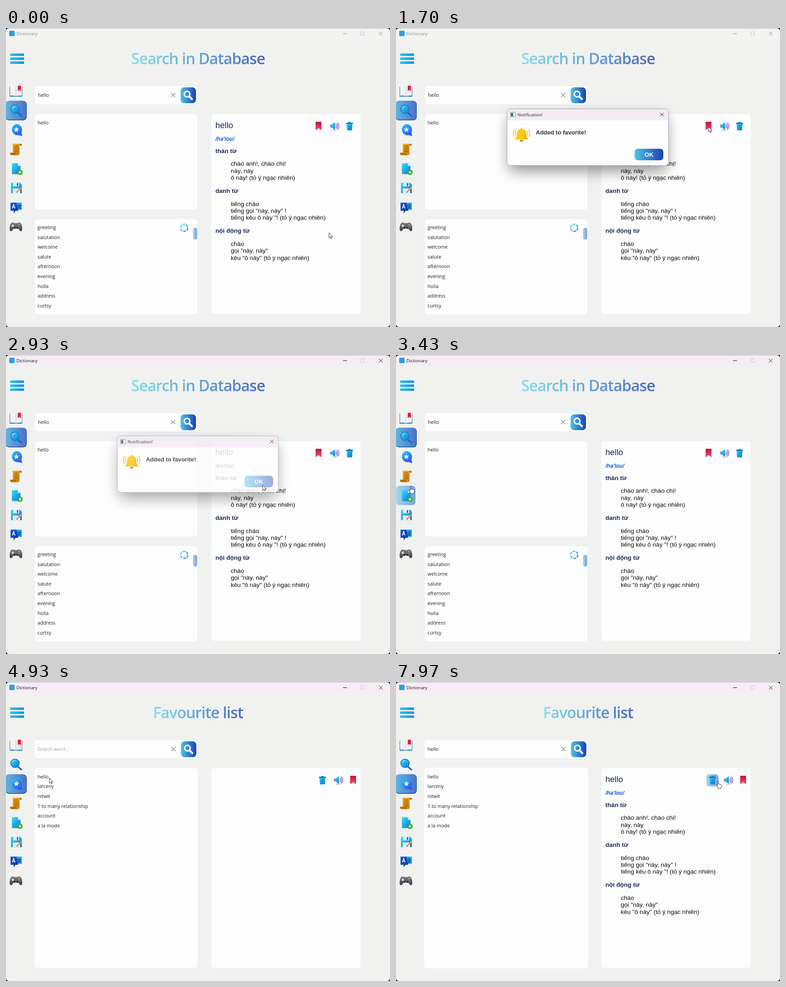
Animation of 849 by 660 pixels, one loop 8000 ms. Source, as an HTML page:

```html
<!DOCTYPE html>
<html lang="en">
<head>
<meta charset="utf-8">
<title>Dictionary</title>
<style>
html, body { margin: 0; width: 100%; height: 100%; overflow: hidden; background: #1c3350; }
svg { display: block; width: 100vw; height: 100vh; }
text { white-space: pre; }
.ui { font-family: "Open Sans", "Noto Sans", sans-serif; font-size: 10.7px; font-weight: 500; fill: #222; }
.bar { font-size: 9.8px; font-weight: 400; }
.head { font-size: 34px; font-weight: 600; letter-spacing: -1px; fill: url(#headFill); text-anchor: middle; }
.def { font-family: "Liberation Sans", Arial, sans-serif; font-size: 13.6px; fill: #0c0c10; }
.kind { font-weight: bold; fill: #1c2852; }
.panel { fill: #fcfdfc; stroke: #e0eef5; stroke-width: 1; }
</style>
</head>
<body>
<svg viewBox="0 0 849 660" preserveAspectRatio="none">
<defs>
  <linearGradient id="headFill"><stop stop-color="#82e0ee"/><stop offset="1" stop-color="#4a69c0"/></linearGradient>
  <linearGradient id="button"><stop stop-color="#4cc6e6"/><stop offset="1" stop-color="#1b3fb4"/></linearGradient>
  <linearGradient id="tile"><stop stop-color="#62b4e2"/><stop offset="1" stop-color="#4c70c6"/></linearGradient>
  <linearGradient id="soft"><stop stop-color="#a5d6ee"/><stop offset="1" stop-color="#7d9fdb"/></linearGradient>
  <linearGradient id="cyan" x2="1" y2="1"><stop stop-color="#2fe0f8"/><stop offset="1" stop-color="#1470d8"/></linearGradient>
  <linearGradient id="bubble" x2=".6" y2="1"><stop stop-color="#1cd0f4"/><stop offset="1" stop-color="#3a52f0"/></linearGradient>
  <linearGradient id="red" x2="0" y2="1"><stop stop-color="#c8103c"/><stop offset="1" stop-color="#f0506c"/></linearGradient>
  <linearGradient id="gold" x2="1" y2="1"><stop stop-color="#f4b428"/><stop offset="1" stop-color="#c87808"/></linearGradient>
  <linearGradient id="navy" x2="1" y2="1"><stop stop-color="#1460d8"/><stop offset="1" stop-color="#0a2c90"/></linearGradient>
  <linearGradient id="pad" x2="0" y2="1"><stop stop-color="#7c7f86"/><stop offset="1" stop-color="#3c3e46"/></linearGradient>
  <filter id="blur" x="-30%" y="-60%" width="160%" height="220%"><feGaussianBlur stdDeviation="16"/></filter>

  <g id="bookmark"><path d="M-6.5-9.5h13v19L0 4.5l-6.500 5z" fill="url(#red)"/></g>
  <g id="speaker">
    <ellipse cx="0" cy="9" rx="6" ry="1" fill="#b8c4cc"/>
    <path d="M-9-3.500h5v7h-5z" fill="#8b9bb0"/>
    <path d="M-5-3.500L2-8.500V8.500L-5 3.500z" fill="url(#cyan)"/>
    <g fill="none" stroke="#6a58c8" stroke-width="1.500" stroke-linecap="round">
      <path d="M4-2.500a3.500 3.500 0 0 1 0 5M5.500-5a6.500 6.500 0 0 1 0 10" /><path d="M7-7.300a9 9 0 0 1 0 14.600" stroke="#a04cc0"/>
    </g>
  </g>
  <g id="trash">
    <path d="M-6.500-5h13L5.500 8.500q-.2 1-1.200 1h-8.600q-1 0-1.200-1z" fill="url(#cyan)"/>
    <path d="M-7.500-7.500h15v2.800h-15zM-2.500-9h5v2h-5z" fill="#0e74c0"/>
    <path d="M-3-3l.5 10M0-3v10M3-3l-.5 10" stroke="#1280cc" stroke-width="1"/>
  </g>
  <g id="lens" fill="none" stroke="#fff" stroke-width="3">
    <circle cx="-2.200" cy="-2.500" r="6.200"/><path d="M2.800 2.800L8.500 8.500" stroke-width="4.500" stroke-linecap="round"/>
  </g>
  <g id="i0">
    <path d="M-14-9v22h28V-9z" fill="#1c78b4"/>
    <path d="M-13-10q7-2 13 1q6-3 13-1v21q-7-1-13 1q-6-2-13-1z" fill="#f3f3f5"/>
    <path d="M0-9V12" stroke="#c4c8d0" stroke-width="1.300"/>
    <path d="M4-11h7v12l-3.500-3L4 1z" fill="#e01c3c"/>
  </g>
  <g id="i1">
    <path d="M5 6L12 12" stroke="#1668b8" stroke-width="3.500" stroke-linecap="round"/>
    <circle cx="-2" cy="-2" r="9.500" fill="url(#cyan)" stroke="#1678bc" stroke-width="1.500"/>
    <path d="M-8-3a6.500 6.500 0 0 1 6-5.500" fill="none" stroke="#8ceefc" stroke-width="1.300"/>
  </g>
  <g id="i2">
    <path d="M1-12.500a12.500 12.500 0 0 1 11 18.500l2 8-8-2a12.500 12.500 0 1 1-5-24.500z" fill="url(#bubble)"/>
    <path id="star" fill="#fff"/>
  </g>
  <g id="i3">
    <path d="M-8-12H10q3 0 3 4H8V9q0 4-4 4h-14q-3 0-3-5h6V-8z" fill="url(#gold)"/>
    <path d="M-13 8h14q0 5 3 5h-14q-3 0-3-5zM8-8q0-4 2.500-4t2.500 4z" fill="#b86c08"/>
    <path d="M-4-7h9M-4-3h9M-4 1h9M-4 5h9" stroke="#9a5808" stroke-width="1.300"/>
  </g>
  <g id="i4">
    <path d="M-9-12H4l6 6V12H-9z" fill="url(#cyan)"/><path d="M4-12v6h6z" fill="#a4f2fc"/>
    <circle cx="9" cy="8" r="6" fill="#38b438"/><path d="M6 8h6M9 5v6" stroke="#fff" stroke-width="1.500"/>
  </g>
  <g id="i5">
    <path d="M-11-12H9l4 4V11H-11z" fill="url(#cyan)"/>
    <path d="M-6-12H7v8H-6z" fill="#e8f0f6"/><path d="M2-11h3v6H2z" fill="#1464a8"/>
    <path d="M-7 1H9v10H-7z" fill="#fafafa"/><path d="M-5 4H3M-5 7H1" stroke="#b0bcc8"/>
    <path d="M3 8L12-1" stroke="#f09820" stroke-width="3.200"/><path d="M1 10l1-3 2 2z" fill="#503820"/>
  </g>
  <g id="i6">
    <path d="M0-11H13V5H0z" fill="#20a4ec"/>
    <path d="M-12-11H1L5 7H-1L-5 13V7h-7z" fill="url(#navy)"/>
    <path d="M-8 2l3-9 3 9M-7-1h4" fill="none" stroke="#fff" stroke-width="1.500"/>
    <path d="M3-5h8M7-7v2M4 2q5-2 6-7M4.500-4q1 4 6 6" fill="none" stroke="#123c90" stroke-width="1.300"/>
  </g>
  <g id="i7">
    <path d="M-8-10q3-1 4 1h8q1-2 4-1c4 0 6 8 6 14s-4 6-6 3l-3-4h-10l-3 4c-2 3-6 3-6-3s2-14 6-14z" fill="url(#pad)"/>
    <path d="M-10-3h6M-7-6v6" stroke="#e4e4e8" stroke-width="2"/>
    <circle cx="7" cy="-5.500" r="1.300" fill="#f0c030"/><circle cx="7" cy="-.5" r="1.300" fill="#48b848"/>
    <circle cx="4.500" cy="-3" r="1.300" fill="#3c90e8"/><circle cx="9.500" cy="-3" r="1.300" fill="#e84040"/>
    <circle cx="-3" cy="2" r="2" fill="#292b32"/><circle cx="3" cy="2" r="2" fill="#292b32"/>
  </g>
</defs>

<rect width="849" height="660" fill="#1c3350"/>
<rect y=".5" width="849" height="659.500" rx="7" fill="#f1f2ef"/>
<path id="titleBar" d="M0 25V7.500a7 7 0 0 1 7-7h835a7 7 0 0 1 7 7V25z"/>
<rect x="7" y="6" width="12" height="12" rx="2" fill="#2f9fe0"/>
<text id="appName" class="ui bar" x="23" y="16.300">Dictionary</text>
<g id="controls" fill="none" stroke-width="1"><path d="M745 12.500h9M824.500 8.500l8 8M832.500 8.500l-8 8"/></g>
<rect x="784.500" y="8.500" width="7.500" height="7.500" rx="1" fill="none" stroke="#c4c0c6"/>

<g fill="url(#cyan)">
  <rect x="9" y="56" width="31" height="5.500" rx="1.500"/><rect x="9" y="64.800" width="31" height="5.500" rx="1.500"/><rect x="9" y="73.500" width="31" height="5.500" rx="1.500"/>
</g>
<rect id="hoverTile" width="43" height="43" rx="8" fill="url(#soft)"/>
<g id="activeTile"><rect x="-1" y="-21" width="47" height="43" rx="8" fill="#244a80"/><rect x="-1" y="-21" width="46.500" height="41.500" rx="8" fill="url(#tile)"/></g>
<g id="side"></g>

<g id="searchPage">
  <text class="ui head" x="424.500" y="80">Search in Database</text>
  <rect class="panel" x="63" y="127" width="361" height="42.500" rx="8"/>
  <rect class="panel" x="63" y="189" width="361" height="212.500" rx="8"/>
  <rect class="panel" x="63" y="421" width="361" height="212" rx="8"/>
  <text class="ui" x="70.500" y="152">hello</text>
  <g id="related"></g>
  <circle cx="394" cy="441" r="8" fill="none" stroke="url(#cyan)" stroke-width="2.200" stroke-dasharray="6.380 2"/>
  <rect x="413.500" y="441" width="9" height="26" rx="4" fill="url(#soft)"/>
</g>
<g id="favPage">
  <text class="ui head" x="424.500" y="80">Favourite list</text>
  <rect class="panel" x="62" y="127" width="362" height="42.500" rx="8"/>
  <rect id="favList" class="panel" rx="8"/>
  <text id="query" class="ui" x="69.500" y="152"></text>
  <g id="favs"></g>
</g>
<g id="searchTools">
  <path d="M365 143.500l9 9M374 143.500l-9 9" stroke="#b0b0ae" stroke-width="2.200"/>
  <rect x="386" y="131" width="34" height="35" rx="8" fill="url(#button)"/><use href="#lens" x="402.500" y="148.500"/>
</g>
<rect class="panel" x="453" y="189" width="332" height="443" rx="8"/>
<g id="entry"></g>
<rect id="hoverTool" y="203.500" width="27" height="27" rx="7" fill="url(#soft)"/>
<use id="trashTool" href="#trash" y="216.500"/><use id="soundTool" href="#speaker" y="216.500"/><use id="markTool" href="#bookmark" y="216.500"/>

<g id="dialog">
  <rect x="250" y="196" width="348" height="120" rx="10" fill="#000" opacity=".42" filter="url(#blur)"/>
  <rect x="245.500" y="178.500" width="357" height="125" rx="8" fill="#fdfdfd" stroke="#a5a3a8"/>
  <path d="M246 204v-17a8 8 0 0 1 8-8h340a8 8 0 0 1 8 8v17z" fill="#f4ecf3"/>
  <rect x="253" y="186" width="11" height="10" fill="#eef2f4" stroke="#8c9298"/><rect x="254" y="187.500" width="5" height="7.500" fill="#258078"/>
  <text class="ui bar" x="268.500" y="195">Notification!</text>
  <path d="M584 187l8 8M592 187l-8 8" stroke="#222"/>
  <g transform="translate(277.500 235)">
    <path d="M0-15q2 0 2 3c6 1 8 6 8 12 0 5 2 8 5 11h-30c3-3 5-6 5-11 0-6 2-11 8-12q0-3 2-3z" fill="#fac814"/>
    <path d="M4-11c5 2 6 6 6 11 0 5 2 8 5 11H5c2-7 2-15-1-22z" fill="#f0b010"/>
    <path d="M-4 12h8q-1 4-4 4t-4-4z" fill="#c88008"/>
    <path d="M-12-9q-3 6 0 12M-16-11q-4 8 0 16M12-9q3 6 0 12M16-11q4 8 0 16" fill="none" stroke="#ecc040" stroke-width="1.800" stroke-linecap="round"/>
  </g>
  <text class="def" x="309" y="235" style="font-size:13px;font-weight:bold;fill:#333">Added to favorite!</text>
  <g id="ok"><rect x="527.500" y="266.500" width="63.500" height="25.500" rx="7" fill="url(#button)"/></g>
  <text class="def" x="559.300" y="284" text-anchor="middle" style="font-size:13px;font-weight:bold;fill:#fff">OK</text>
</g>

<path id="arrow" d="M0 0V11.500L2.700 9 4.500 13l1.800-.8L4.600 8.300H8z" fill="#fff" stroke="#222" stroke-width=".9"/>
<path id="hand" d="M-1 .5q1-1.500 2 0V6l5.500 1.500q1.500.5 1.300 2.500L7 13.500 6 16H0l-1.500-3L-4 9.500q0-2 2-1l1 1z" fill="#fff" stroke="#222" stroke-width=".9"/>
</svg>

<script>
const LOOP = 8000;
const PRESS = 1000, OPEN = 1180, CLOSE = 2900, FADE = 200, SWITCH = 4000, PICK = 5100;
const $ = id => document.getElementById(id);
const set = (el, attrs) => { for (const k in attrs) el.setAttribute(k, attrs[k]); };
const show = (id, on) => { $(id).style.display = on ? "" : "none"; };
const add = (parent, tag, attrs, text = "") => {
  const el = document.createElementNS("http://www.w3.org/2000/svg", tag);
  set(el, attrs);
  el.textContent = text;
  parent.append(el);
  return el;
};

const sideY = i => 138.5 + 43 * i;
for (let i = 0; i < 8; i++) add($("side"), "use", { href: "#i" + i, x: 22, y: sideY(i) });

set($("star"), { d: "M" + Array.from({ length: 10 }, (_, i) => {
  const r = i % 2 ? 2.7 : 6.3, a = i * Math.PI / 5;
  return [1 + r * Math.sin(a), -r * Math.cos(a)].map(v => v.toFixed(2));
}).join("L") + "z" });

const list = (id, y, words) => words.forEach((word, i) =>
  add($(id), "text", { class: "ui", x: 69.8, y: y + 21.6 * i }, word));
list("related", 212.7, ["hello"]);
list("related", 444, ["greeting", "salutation", "welcome", "salute", "afternoon", "evening", "holla", "address", "curtsy"]);
list("favs", 212.7, ["hello", "larceny", "nitwit", "1 to many relationship", "account", "a la mode"]);

const line = (x, y, text, cls = "def", style = "") => add($("entry"), "text", { x, y, class: cls, style }, text);
line(463, 221.3, "hello", "def", "font-size:18.5px;fill:#1a2550");
line(463, 249, "/hə'lou/", "def", "font-size:12px;font-weight:bold;font-style:italic;fill:#0c5ce0");
[
  ["thán từ", "chào anh!, chào chị!", "này, này", "ô này! (tỏ ý ngạc nhiên)"],
  ["danh từ", "tiếng chào", "tiếng gọi \"này, này\" !", "tiếng kêu ô này \"! (tỏ ý ngạc nhiên)"],
  ["nội động từ", "chào", "gọi \"này, này\"", "kêu \"ô này\" (tỏ ý ngạc nhiên)"]
].forEach(([kind, ...senses], i) => {
  const y = 275.5 + 88.3 * i;
  line(463, y, kind, "def kind");
  senses.forEach((s, j) => line(497, y + 28.9 + 15.3 * j, s));
});

// Pointer stops: time, x, y
const path = [
  [0, 714, 452], [250, 714, 452], [800, 691, 218], [2000, 691, 218], [2550, 575, 285],
  [2900, 573, 287], [3430, 33, 290], [3750, 24, 228], [4050, 24, 226], [4600, 80, 214],
  [4930, 96, 212], [5150, 96, 212], [5750, 788, 330], [6130, 600, 360], [6430, 458, 370],
  [6950, 732, 219], [7500, 735, 217], [7900, 712, 219], [8000, 712, 219]
];
const ease = p => p * p * (3 - 2 * p);
const clamp = p => Math.max(0, Math.min(1, p));

function pointer(t) {
  const i = Math.max(1, path.findIndex(k => k[0] > t));
  const [t0, x0, y0] = path[i - 1], [t1, x1, y1] = path[i];
  const p = ease((t - t0) / (t1 - t0));
  return [x0 + (x1 - x0) * p, y0 + (y1 - y0) * p];
}

function draw(t) {
  const [x, y] = pointer(t);
  const fav = t >= SWITCH, picked = t >= PICK;
  const modal = t >= OPEN && t < CLOSE;
  const focused = t >= PRESS && !modal;

  set($("titleBar"), { fill: focused ? "#f6edf4" : "#f3f3f2" });
  $("appName").style.fill = focused ? "#111" : "#888";
  set($("controls"), { stroke: focused ? "#111" : "#888" });

  show("searchPage", !fav);
  show("favPage", fav);
  show("entry", !fav || picked);
  set($("searchTools"), { transform: `translate(${fav ? 0.8 : 0} 0)` });
  const grow = picked ? 1 : 0;
  set($("favList"), { x: 62 - grow, y: 189 - grow, width: 363 + 2 * grow, height: 443 + 2 * grow });
  $("query").textContent = picked ? "hello" : "Search word...";
  $("query").style.fill = picked ? "#222" : "#a5a5a3";

  const active = fav ? 2 : 1;
  set($("activeTile"), { transform: `translate(0 ${sideY(active) + 0.3})` });
  const row = !modal && x < 46 && y > 117 ? Math.floor((y - 117) / 43) : -1;
  const onSide = row >= 0 && row < 8;
  show("hoverTile", onSide && row !== active);
  if (onSide) set($("hoverTile"), { y: sideY(row) - 22 });

  const tools = fav ? { trash: 699.5, sound: 734, mark: 767.5 } : { mark: 691, sound: 725.5, trash: 759.5 };
  for (const k in tools) set($(k + "Tool"), { x: tools[k] });
  const tool = Object.values(tools).find(c => Math.abs(x - c) < 13.5 && Math.abs(y - 217) < 13.5);
  const onTool = !modal && tool !== undefined;
  show("hoverTool", onTool);
  if (onTool) set($("hoverTool"), { x: tool - 13.5 });

  const enter = clamp((t - OPEN) / 150), leave = clamp((t - CLOSE) / FADE);
  const size = 0.92 + 0.08 * ease(enter) - 0.1 * leave * leave;
  show("dialog", t >= OPEN && leave < 1);
  set($("dialog"), {
    opacity: enter * (1 - leave),
    transform: `translate(424 241) scale(${size}) translate(-424 -241)`
  });
  const onOk = x > 527 && x < 591 && y > 266 && y < 292;
  set($("ok"), { opacity: onOk ? 0.5 : 1 });

  const hand = onSide || onTool;
  show("hand", hand);
  show("arrow", !hand);
  set($(hand ? "hand" : "arrow"), { transform: `translate(${x} ${y})` });
}

const start = performance.now();
function tick(now) {
  draw(Math.max(0, now - start) % LOOP);
  requestAnimationFrame(tick);
}
draw(0);
requestAnimationFrame(tick);
</script>
</body>
</html>
```
